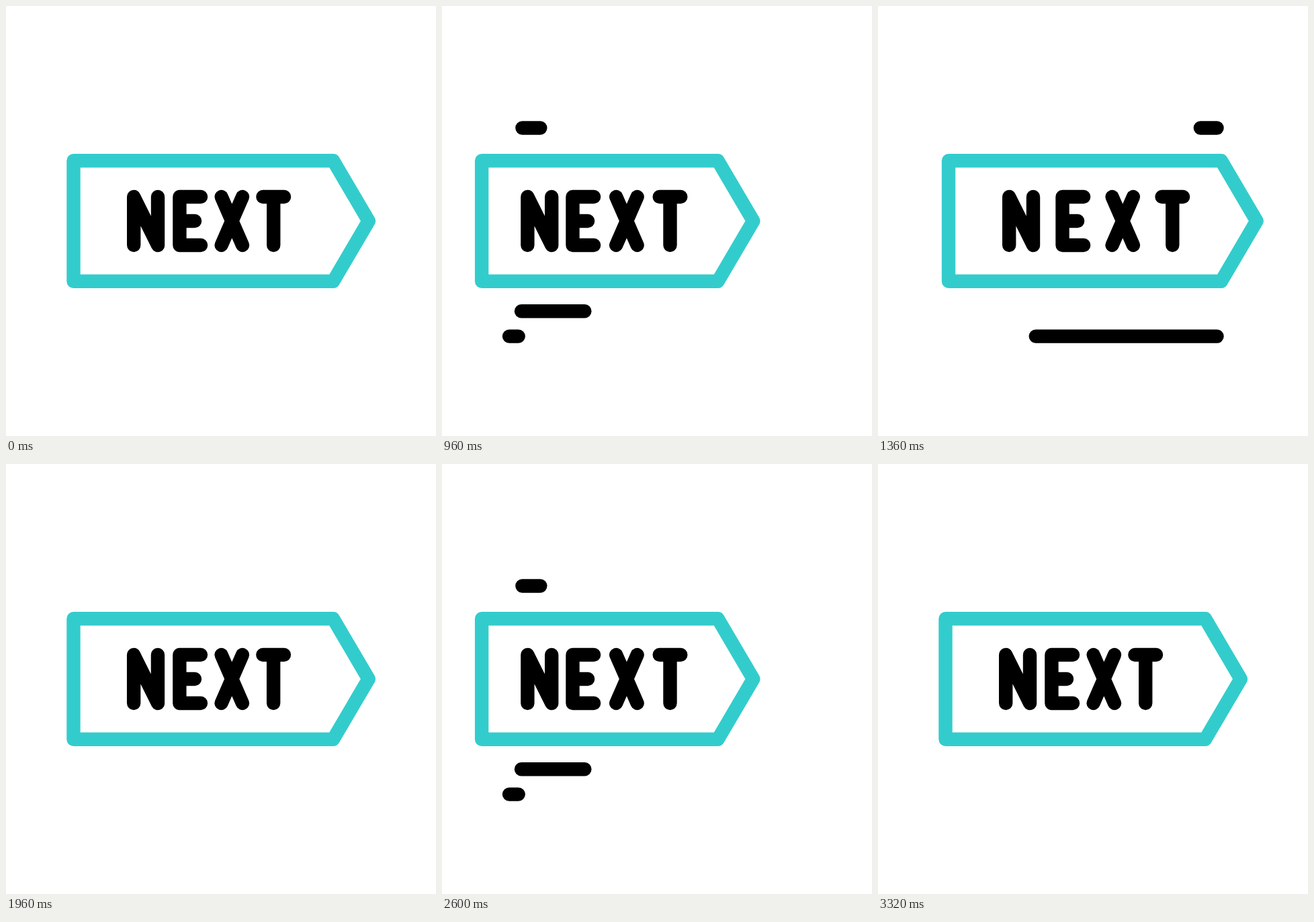
Recreate the animation shown at these times as an HTML page. Size 640x640 px, loop 3.6 s.

```html
<!DOCTYPE html>
<html lang="en">
<head>
<meta charset="utf-8">
<title>Next</title>
<style>
  html, body { margin: 0; width: 100%; height: 100%; overflow: hidden; background: #fff; }
  svg { display: block; width: 100%; height: 100%; }
  path { fill: none; stroke: #000; stroke-width: 20.4; stroke-linecap: round; stroke-linejoin: round; }
  #sign { stroke: #33cccc; }
</style>
</head>
<body>
<svg viewBox="0 0 640 640" role="img" aria-label="NEXT">
  <path id="sign"/>
  <g id="word">
    <path d="M190.2 356V284L226 356V284"/>
    <path d="M290 284H258.4V356H290M258.4 320H281"/>
    <path d="M320.6 284L352 356M352 284L320.6 356"/>
    <path d="M382.4 284H414M398.2 284V356"/>
  </g>
  <g id="dashes"></g>
</svg>
<script>
const LOOP = 3600, STEP = 20, CYCLE = 1640, START = 300;

// how far each part pulls back to the left, then overshoots to the right
const tail = { back: 52, over: 11.5 };
const tip = { back: 104, over: 60.5 };
const letters = [
  { back: 78, over: 12.7 },
  { back: 85, over: 41 },
  { back: 88, over: 71 },
  { back: 91, over: 102 }
];

// speed lines: each is drawn on from the left, then wiped off to the right
const lines = [
  { y: 181.5, from: 119.4, grow: 820, wipe: 1039, dur: 458 },
  { y: 454.3, from: 118, grow: 820, wipe: 960, dur: 335 },
  { y: 491.6, from: 100, grow: 820, wipe: 1112, dur: 549 }
];
const LINE_END = 504.5;

const sign = document.getElementById('sign');
const dashes = document.getElementById('dashes');
document.querySelectorAll('#word path').forEach((el, i) => letters[i].el = el);
for (const line of lines) {
  line.el = document.createElementNS('http://www.w3.org/2000/svg', 'path');
  dashes.append(line.el);
}

const progress = (t, from, to) => Math.min(1, Math.max(0, (t - from) / (to - from)));
const smooth = p => p * p * (3 - 2 * p);
const slowStart = p => smooth(p * p);
const slowEnd = p => 1 - slowStart(1 - p);
const quart = p => p < 0.5 ? 8 * p ** 4 : 1 - 8 * (1 - p) ** 4;

function draw(ms) {
  let t = Math.floor((ms % LOOP) / STEP) * STEP;
  if (t >= START + CYCLE) t -= CYCLE;

  const pull = slowEnd(progress(t, 316, 779));
  const launch = slowStart(progress(t, 720, 1191));
  const settle = slowEnd(progress(t, 1191, 1680));
  const shift = ({ back, over }) => back * (launch - pull) + over * (launch - settle);

  const left = 100.5 + shift(tail), end = shift(tip);
  sign.setAttribute('d',
    `M${left} 230.2H${487 + end}L${539.8 + end} 320L${487 + end} 409.8H${left}Z`);
  for (const letter of letters)
    letter.el.setAttribute('transform', `translate(${shift(letter)})`);

  for (const { el, y, from, grow, wipe, dur } of lines) {
    const at = start => from + (LINE_END - from) * quart(progress(t, start, start + dur));
    const shown = t > grow && t < wipe + dur;
    el.setAttribute('d', shown ? `M${at(wipe)} ${y}H${at(grow) + 0.01}` : '');
  }
}

const began = performance.now();
function tick() {
  draw(performance.now() - began);
  requestAnimationFrame(tick);
}
tick();
</script>
</body>
</html>
```
